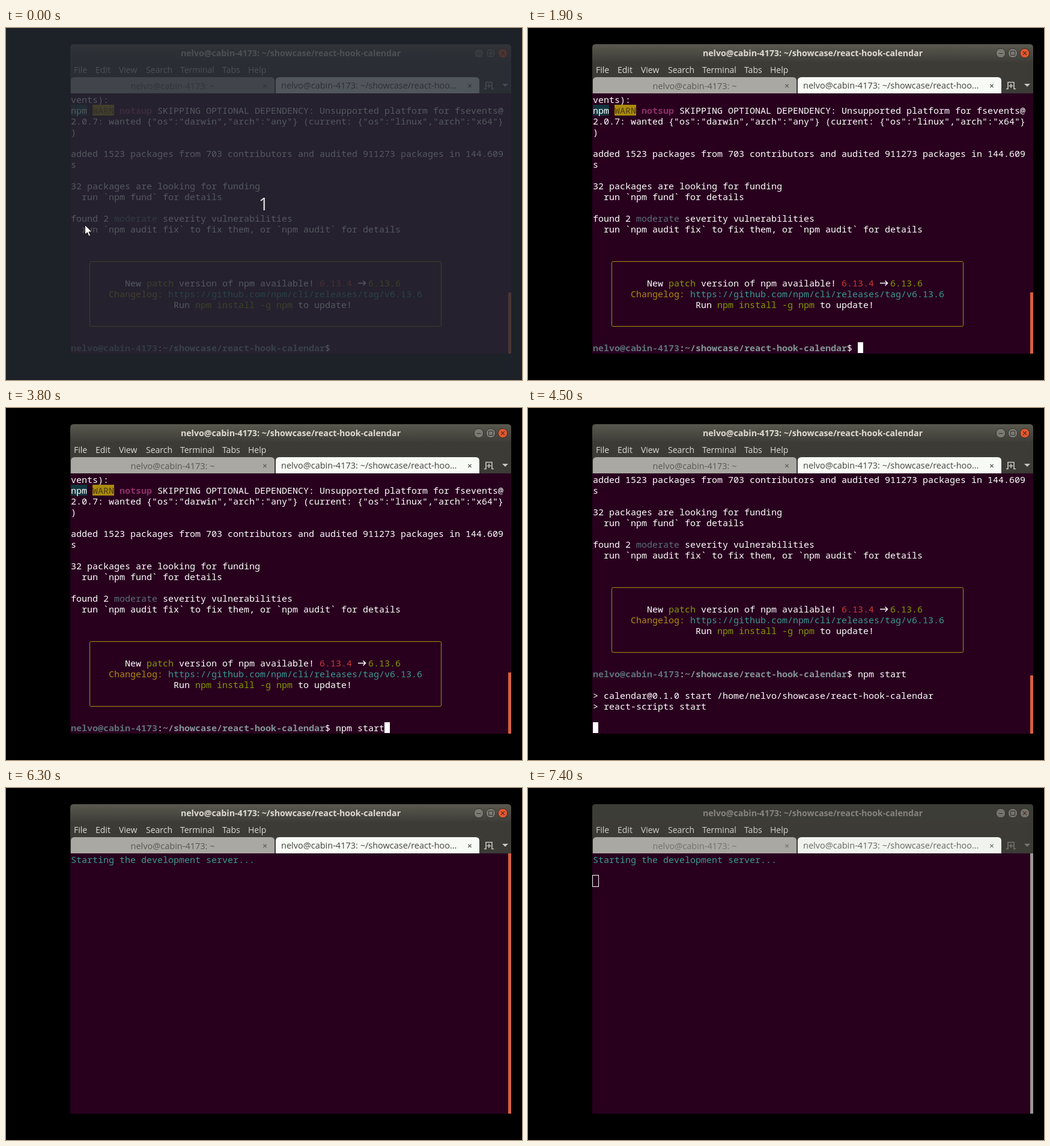
Recreate the animation shown at these times as an HTML page. Size 859 by 587 pixels, loop 8 s.

```html
<!DOCTYPE html>
<html lang="en">
<head>
<meta charset="utf-8">
<title>Terminal</title>
<style>
html, body { margin: 0; width: 100%; height: 100%; overflow: hidden; background: #000; }
svg { display: block; }
text { white-space: pre; }
.mono { font: 15px "Noto Sans Mono", "DejaVu Sans Mono", monospace; }
.ui { font: 14px "Open Sans", "Noto Sans", sans-serif; }
.tab { font-size: 14.5px; }
.title { font-size: 14.2px; font-weight: 700; }
.bold { font-weight: 700; }
</style>
</head>
<body>
<svg id="stage" width="859" height="587" viewBox="0 0 859 587">
  <defs>
    <linearGradient id="bar" x2="0" y2="1">
      <stop stop-color="#5a594f"/><stop offset="1" stop-color="#3e3d38"/>
    </linearGradient>
    <clipPath id="screen"><rect x="107" y="109" width="734" height="434"/></clipPath>
  </defs>
  <rect width="859" height="587"/>
  <g id="active"></g>
  <g id="inactive"></g>
  <rect x="107" y="109" width="734" height="434" fill="#28001e"/>
  <g clip-path="url(#screen)" class="mono">
    <g id="log"></g>
    <g id="run"></g>
    <g id="server"></g>
    <rect id="block" width="9" height="18" fill="#fff"/>
    <rect id="hollow" x="107.5" y="145.5" width="10" height="19" fill="none" stroke="#fff"/>
  </g>
  <rect id="thumb" x="836" width="5"/>
  <path id="beam" d="M130.5 323.5h2l1 1 1-1h2M133.5 324v14M130.5 338.5h2l1-1 1 1h2" fill="none" stroke="#e8e8e8"/>
  <g id="countdown">
    <rect width="859" height="587" fill="#252a33" opacity=".79"/>
    <text class="ui" x="429" y="304" text-anchor="middle" fill="#dcdee0" style="font-size:29px">1</text>
    <path d="M131.5 328.5v16l3.8-3.5 2.7 6.2 2.6-1.2-2.7-6h5z" fill="#fff" stroke="#111"/>
  </g>
</svg>
<script>
const $ = id => document.getElementById(id);
const NS = "http://www.w3.org/2000/svg";
const CELL = 9, LINE = 18, LEFT = 108, TOP = 110, LOOP = 8000;
const colX = col => LEFT + col * CELL;
const rowY = row => TOP + row * LINE;

const WHITE = "#fff", GREEN = "#859900", CYAN = "#3a9a93", GOLD = "#b08a10",
      RED = "#cb3a35", GRAY = "#5d7078", PINK = "#8f2f68", SILVER = "#839496";
const USER = "nelvo", HOST = USER + "@cabin-4173";
const DIR = "/showcase/react-hook-calendar";

function add(parent, tag, attrs, text) {
  const el = document.createElementNS(NS, tag);
  for (const key in attrs) el.setAttribute(key, attrs[key]);
  if (text) el.textContent = text;
  return parent.appendChild(el);
}

function print(parent, row, col, text, fill = WHITE, bold = false) {
  return add(parent, "text", { x: colX(col), y: rowY(row) + 15, fill, class: bold ? "bold" : "" }, text);
}

function drawChrome(g, c) {
  const label = (x, y, text, fill, cls = "", anchor = "start") =>
    add(g, "text", { x, y, fill, class: "ui " + cls, "text-anchor": anchor }, text);
  const tab = (x, fill) =>
    add(g, "path", { d: `M${x} 109V88q0-6 6-6h327q6 0 6 6v21z`, fill });
  const cross = (x, y, r, stroke) =>
    add(g, "path", { d: `M${x - r} ${y - r}l${2 * r} ${2 * r}m0 ${-2 * r}l${-2 * r} ${2 * r}`, stroke, "stroke-width": 1.2 });

  add(g, "path", { d: "M107 109V33q0-6 6-6h722q6 0 6 6v76z", fill: "#3c3b36" });
  add(g, "path", { d: "M107 56V33q0-6 6-6h722q6 0 6 6v23z", fill: c.bar });
  label(474, 47, `${HOST}: ~${DIR}`, c.title, "title", "middle");

  [787, 807, 827].forEach((cx, i) =>
    add(g, "circle", { cx, cy: 42, r: 7.8, fill: i == 2 ? c.close : c.button, stroke: "#32312d" }));
  add(g, "path", { d: "M783.5 42.5h7M803.5 38.5h7v7h-7z", fill: "none", stroke: "#32312d" });
  cross(827, 42, 2.8, "#4a2a20");

  const menu = { File: 113, Edit: 149, View: 188, Search: 233, Terminal: 290, Tabs: 360, Help: 403 };
  for (const name in menu) label(menu[name], 75, name, c.menu);

  tab(108, "#a9a8a2");
  tab(449, c.tab);
  label(277.5, 102, `${HOST}: ~`, c.idle, "tab", "middle");
  label(458, 101, `${HOST}: ~/showcase/react-hoo…`, c.label, "tab");
  cross(431, 96.5, 2.6, c.idle);
  cross(772, 96.5, 2.6, c.label);
  add(g, "path", { d: "M796 101.5h3v-11h10v11h3M804 93v7M800.5 96.5h7", fill: "none", stroke: c.icon, "stroke-width": 1.6 });
  add(g, "path", { d: "M826 93h10l-5 5z", fill: c.icon });
}

drawChrome($("active"), { bar: "url(#bar)", title: "#dfdbd2", close: "#e2582f", button: "#7b7a72",
  menu: "#dfdbd2", tab: "#f8faf6", idle: "#5a5955", label: "#45443f", icon: "#c9c7be" });
drawChrome($("inactive"), { bar: "#3d3d37", title: "#85847d", close: "#74736c", button: "#74736c",
  menu: "#d2d0c8", tab: "#f1f4ee", idle: "#73726d", label: "#676762", icon: "#77766f" });

const log = $("log");
add(log, "rect", { x: colX(0), y: rowY(1), width: 27, height: 18, fill: "#12363e" });
add(log, "rect", { x: colX(4), y: rowY(1), width: 36, height: 18, fill: "#ab8b0c" });
add(log, "rect", { x: 139.5, y: 389.5, width: 585, height: 108, rx: 2, fill: "none", stroke: GOLD });
add(log, "path", { d: "M586 425.5h12M594.5 421.5l4 4-4 4", fill: "none", stroke: WHITE, "stroke-width": 1.5 });
[
  [0, 0, "vents):"],
  [1, 0, "npm"], [1, 4, "WARN", "#4a3b10"], [1, 9, "notsup", PINK, true],
  [1, 16, "SKIPPING OPTIONAL DEPENDENCY: Unsupported platform for fsevents@"],
  [2, 0, '2.0.7: wanted {"os":"darwin","arch":"any"} (current: {"os":"linux","arch":"x64"}'],
  [3, 0, ")"],
  [5, 0, "added 1523 packages from 703 contributors and audited 911273 packages in 144.609"],
  [6, 0, "s"],
  [8, 0, "32 packages are looking for funding"],
  [9, 2, "run `npm fund` for details"],
  [11, 0, "found 2"], [11, 8, "moderate", GRAY], [11, 17, "severity vulnerabilities"],
  [12, 2, "run `npm audit fix` to fix them, or `npm audit` for details"],
  [17, 10, "New"], [17, 14, "patch", GREEN], [17, 20, "version of npm available!"],
  [17, 46, "6.13.4", RED], [17, 55, "6.13.6", GREEN],
  [18, 7, "Changelog:", GOLD], [18, 18, "https://github.com/npm/cli/releases/tag/v6.13.6", CYAN],
  [19, 19, "Run"], [19, 23, "npm install -g npm", GREEN], [19, 42, "to update!"],
  [23, 0, HOST, GRAY, true], [23, 16, ":"], [23, 17, "~" + DIR, SILVER, true], [23, 47, "$"]
].forEach(line => print(log, ...line));
const command = print(log, 23, 49, "");

print($("run"), 20, 0, `> calendar@0.1.0 start /home/${USER}${DIR}`);
print($("run"), 21, 0, "> react-scripts start");
print($("server"), 0, 0, "Starting the development server...", CYAN);

// Each step changes only the listed properties: [start in ms, changes].
const base = { page: "log", typed: "", cursor: true, beam: false, dim: false, blur: 0 };
const steps = [
  [0, { dim: true, cursor: false }],
  [300, { dim: false, cursor: true, beam: true }],
  [900, { cursor: false }],
  [1900, { cursor: true, beam: false }],
  [2000, { typed: "n" }],
  [2200, { typed: "npm" }],
  [2300, { typed: "npm " }],
  [3000, { typed: "npm" }],
  [3200, { typed: "npm s" }],
  [3300, { typed: "npm st" }],
  [3400, { typed: "npm sta" }],
  [3800, { typed: "npm start" }],
  [4500, { page: "run" }],
  [5000, { cursor: false }],
  [5100, { cursor: true }],
  [5700, { cursor: false }],
  [6300, { page: "server" }],
  [6400, { cursor: true }],
  [6500, { blur: 0.5 }],
  [6600, { blur: 1 }],
  [7300, { beam: true }],
  [7400, { beam: false }]
];
let last = base;
const states = steps.map(([at, change]) => last = { ...last, ...change, at });

const show = (id, on) => $(id).setAttribute("visibility", on ? "visible" : "hidden");

function apply(s) {
  const server = s.page == "server", run = s.page == "run";
  show("log", !server);
  show("run", run);
  show("server", server);
  log.setAttribute("transform", `translate(0 ${run ? -5 * LINE : 0})`);
  command.textContent = s.typed;

  const [row, col] = server ? [2, 0] : run ? [23, 0] : [23, 49 + s.typed.length];
  $("block").setAttribute("x", colX(col));
  $("block").setAttribute("y", rowY(row));
  show("block", s.cursor && !s.blur);
  show("hollow", s.cursor && s.blur);

  const top = server ? 109 : run ? 446 : 441;
  $("thumb").setAttribute("y", top);
  $("thumb").setAttribute("height", 543 - top);
  $("thumb").setAttribute("fill", ["#d4623f", "#b77c69", "#999894"][s.blur * 2]);
  $("inactive").setAttribute("opacity", s.blur);
  show("beam", s.beam);
  show("countdown", s.dim);
}

let shown;
function tick() {
  const t = performance.now() % LOOP;
  const state = states.findLast(s => s.at <= t);
  if (state !== shown) apply(shown = state);
  requestAnimationFrame(tick);
}
tick();
</script>
</body>
</html>
```
